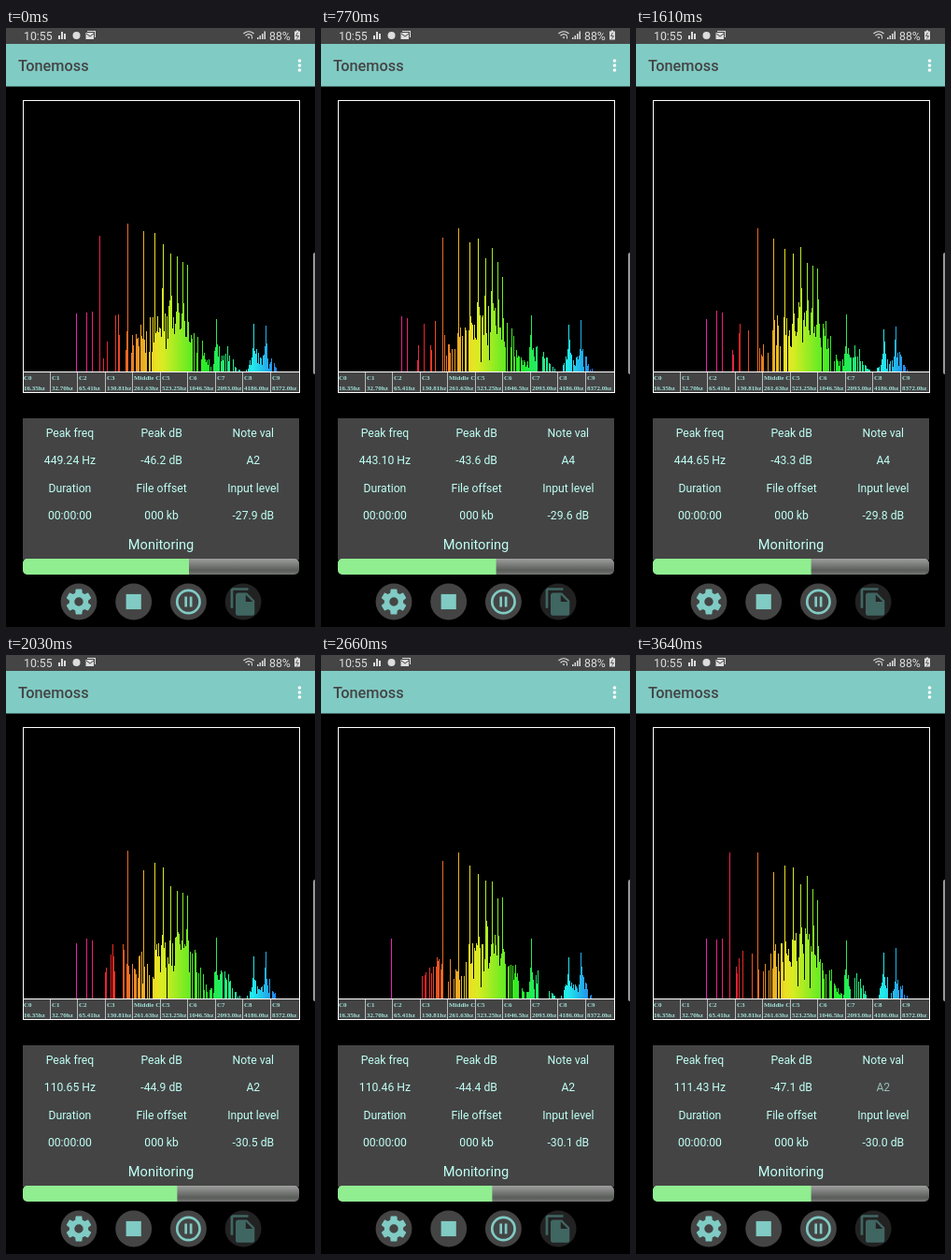
An HTML page for the animation above (3710 ms loop, 331 px wide and 640 px high).

```html
<!DOCTYPE html>
<html lang="en">
<head>
<meta charset="utf-8">
<title>Tonemoss</title>
<style>
  html, body { margin: 0; height: 100%; overflow: hidden; background: #000; }
  svg { display: block; font-family: Roboto, sans-serif; }
  .axis { font: bold 7px "Liberation Serif", serif; fill: #9fe0d8; }
  .panel { font-size: 12.2px; fill: #bffff4; text-anchor: middle; }
  .status { font-size: 12.3px; fill: #ddd; }
  .icon { fill: #80cbc4; }
</style>
</head>
<body>
<svg width="331" height="640" viewBox="0 0 331 640">
  <defs>
    <linearGradient id="hue" gradientUnits="userSpaceOnUse" x1="18" y1="0" x2="314" y2="0"></linearGradient>
    <linearGradient id="track" x2="0" y2="1">
      <stop stop-color="#9d9e9d"/><stop offset=".75" stop-color="#5a5d5a"/><stop offset="1" stop-color="#747674"/>
    </linearGradient>
    <clipPath id="pill"><rect x="18" y="567" width="296" height="17" rx="5"/></clipPath>
  </defs>

  <!-- Status bar -->
  <rect width="331" height="17" fill="#454545"/>
  <g class="status">
    <text x="19" y="12.5">10:55</text>
    <text x="282" y="12.5">88%</text>
    <path d="M56 8h2v4h-2zM59 4h2v8h-2zM62 6h2v6h-2z"/>
    <circle cx="75.5" cy="8" r="4"/>
    <path d="M87 3h9v7h-1V4h-8zM85.5 5h8.5v7h-8.5z"/>
    <path d="M86 6l4 3 4-3" fill="none" stroke="#454545"/>
    <path d="M254.5 6q5.500-4.500 11 0M256.500 8.200q3.500-3 7 0" fill="none" stroke="#ddd" stroke-width="1.2"/>
    <path d="M258.500 9.500h3l-1.500 2zM263 8.500h1v3h-1zM269 10h1.500v2h-1.500zM271.500 8h1.500v4h-1.500zM274 6h1.500v6h-1.500zM276.500 3.500h1.500v8.500h-1.500z"/>
    <path d="M309 3.500h2v-1h2v1h2v9h-6z"/>
    <path d="M312.500 5l-2 3.500h3l-2 3" fill="none" stroke="#454545" stroke-width=".8"/>
  </g>

  <!-- App bar -->
  <rect y="17" width="331" height="45.5" fill="#80cbc4"/>
  <text x="13" y="46" font-size="16.3" font-weight="500" fill="#444">Tonemoss</text>
  <g fill="#fff">
    <circle cx="314.5" cy="35" r="1.8"/><circle cx="314.5" cy="40" r="1.8"/><circle cx="314.5" cy="45" r="1.8"/>
  </g>

  <!-- Spectrum -->
  <rect x="18" y="367" width="296" height="22" fill="#444"/>
  <g id="axis" class="axis"></g>
  <path id="bars" stroke="url(#hue)" shape-rendering="crispEdges"/>
  <path d="M18.5 77.5h296v312h-296zM18 367.5h296" fill="none" stroke="#fff" shape-rendering="crispEdges"/>
  <rect x="329" y="240" width="4" height="130" rx="2" fill="#999"/>

  <!-- Readouts -->
  <rect x="18" y="417" width="296" height="151" fill="#444"/>
  <g id="panel" class="panel"><text x="166" y="557" font-size="14.6">Monitoring</text></g>
  <g clip-path="url(#pill)">
    <rect x="18" y="567" width="296" height="17" fill="url(#track)"/>
    <rect id="level" x="18" y="567" height="17" fill="#90ee90"/>
  </g>

  <!-- Buttons, each drawn on a 24 unit grid -->
  <g id="buttons" class="icon"></g>
</svg>

<script>
const LOOP = 3710, TICK = 70, BASE = 367, OCTAVE = 29.5;
const HELD = [5, 10, 14, 20, 22, 28, 30, 35, 37, 45, 47, 51];  // ticks that repeat the picture before

const byId = id => document.getElementById(id);
const rand = (a, b) => {
  const v = Math.sin(a * 12.9898 + b * 78.233) * 43758.5453;
  return v - Math.floor(v);
};
const mix = (a, b, k) => a + (b - a) * k;

function add(parent, tag, attrs, text = '') {
  const el = document.createElementNS('http://www.w3.org/2000/svg', tag);
  for (const name in attrs) el.setAttribute(name, attrs[name]);
  el.textContent = text;
  return parent.appendChild(el);
}

// Hue climbs evenly with pitch
for (let x = 48; x <= 304; x += 8)
  add(byId('hue'), 'stop', { offset: (x - 18) / 296, 'stop-color': `hsl(${(295 + 1.19 * (x - 58)) % 360} 84% 53%)` });

for (let i = 0; i < 10; i++) {
  const x = Math.round(18 + i * OCTAVE), hz = (16.3516 * 2 ** i).toFixed(i < 6 ? 2 : 1);
  if (i) add(byId('axis'), 'path', { d: `M${x - .5} 367v22`, stroke: '#bbb' });
  add(byId('axis'), 'text', { x: x + 1, y: 376 }, i == 4 ? 'Middle C' : 'C' + i);
  add(byId('axis'), 'text', { x: x + 1, y: 387 }, hz + 'hz');
}

const teeth = Array.from({ length: 6 }, (_, i) =>
  `M12 12m-2.400-6l.5-4h3.800l.5 4z`);
const cells = [['Peak freq', 'Peak dB', 'Note val'], ['', '', ''],
  ['Duration', 'File offset', 'Input level'], ['00:00:00', '000 kb', '']
].map((row, r) => row.map((text, c) =>
  add(byId('panel'), 'text', { x: 68.4 + c * 98.2, y: Math.round(437 + r * 29.4) }, text)));
const [freqText, dbText, noteText] = cells[1], levelText = cells[3][2];

const GEAR = 'M19.430 12.980c.04-.32.07-.64.07-.98s-.03-.66-.07-.98l2.110-1.650c.19-.15.24-.42.12-.64l-2-3.460c-.12-.22-.39-.3-.61-.22l-2.490 1c-.52-.4-1.080-.73-1.690-.98l-.38-2.650C14.460 2.180 14.250 2 14 2h-4c-.25 0-.46.18-.49.42l-.38 2.650c-.61.25-1.170.59-1.690.98l-2.490-1c-.23-.09-.49 0-.61.22l-2 3.460c-.13.22-.07.49.12.64l2.110 1.650c-.04.32-.07.65-.07.98s.03.66.07.98l-2.110 1.650c-.19.15-.24.42-.12.64l2 3.460c.12.22.39.3.61.22l2.490-1c.52.4 1.080.73 1.690.98l.38 2.650c.03.24.24.42.49.42h4c.25 0 .46-.18.49-.42l.38-2.650c.61-.25 1.170-.59 1.690-.98l2.490 1c.23.09.49 0 .61-.22l2-3.460c.12-.22.07-.49-.12-.64zM12 15.500a3.500 3.500 0 1 1 0-7 3.500 3.500 0 0 1 0 7z';
const STOP = 'M6 6h12v12H6z';
const PAUSE = 'M9 16h2V8H9zm3-14a10 10 0 1 0 0 20 10 10 0 0 0 0-20zm0 18a8 8 0 1 1 0-16 8 8 0 0 1 0 16zm1-4h2V8h-2z';
const COPY = 'M16 1H4c-1.100 0-2 .9-2 2v14h2V3h12V1zm-1 4l6 6v10c0 1.100-.9 2-2 2H8c-1.100 0-2-.9-2-2V7c0-1.100.9-2 2-2h7zm-1 7h5.500L14 6.500V12z';
[GEAR, STOP, PAUSE, COPY].forEach((d, i) => {
  const x = 78 + i * 58.7;
  const button = add(byId('buttons'), 'g', {
    transform: `translate(${x} 613) scale(1.35) translate(-12 -12)`, opacity: d == COPY ? .5 : 1
  });
  add(button, 'circle', { cx: 12, cy: 12, r: 14.4, fill: '#444' });
  add(button, 'path', { d });
});

// A few readings; those between are blended
const KEYS = [
  [0, 449.24, -46.2, 'A2', -27.9],
  [11, 443.10, -43.6, 'A4', -29.6],
  [17, 445.48, -40.5, 'A4', -28.9],
  [29, 110.65, -44.9, 'A2', -30.5],
  [38, 110.46, -44.4, 'A2', -30.1],
  [46, 445.04, -42.8, 'A2', -30.3],
  [52, 111.43, -47.1, 'A2', -29.96]
].map(([tick, freq, db, note, level]) => ({ tick, freq, db, note, level }));

function readingsAt(tick) {
  const i = KEYS.findLastIndex(k => k.tick <= tick), a = KEYS[i];
  if (a.tick == tick) return a;
  const b = KEYS[i + 1], k = (tick - a.tick) / (b.tick - a.tick);
  const jitter = n => rand(tick, n) - .5;
  return {
    note: a.note,
    freq: (jitter(1) > 0 ? a : b).freq + jitter(2) * 2,
    db: mix(a.db, b.db, k) + jitter(3) * 2,
    level: mix(a.level, b.level, k) + jitter(4) * .8
  };
}

// Overtones of a low A, some bass lines and three high bumps, as [x, height]
function peaksAt(tick, db) {
  const peaks = [[225, 60], [265, 47], [278, 52]];
  for (let n = 1; n < 10; n++) peaks.push([100 + OCTAVE * Math.log2(n), 150 - .55 * n * n]);
  if (Math.abs(db + 44) < 2) peaks[3][1] = 0;  // the fundamental only shows when the volume swings
  for (const x of [75, 86, 92]) peaks.push([x, rand(x, tick) < .75 ? 60 : 0]);
  return peaks.map(([x, h], i) => [Math.round(x), h * mix(.92, 1.08, rand(tick, i + 5))]);
}

// Broad noise hills: centre, height, width
const HILLS = [[118, 62, 16], [150, 48, 16], [180, 72, 20], [205, 34, 9], [233, 32, 11], [266, 26, 6], [280, 24, 7]];
const floorAt = x => x < 103 ? 0 :
  HILLS.reduce((sum, [mid, h, w]) => sum + h * Math.exp(-(((x - mid) / w) ** 2)), 0);

function barPath(tick, peaks) {
  let d = '';
  for (let x = 50; x < 300; x++) {
    const density = x < 135 ? .34 : x < 160 ? .45 : x < 198 ? .93 : .6;
    const fall = x < 140 ? 1 : x < 163 ? .75 : .28;
    const rough = rand(x, tick + 120);
    let h = rand(x, tick + 1) < density ? floorAt(x) * mix(.35, 1.05, rand(x, tick + 60)) : 0;
    for (const [px, top] of peaks) {
      const off = Math.abs(x - px);
      h = Math.max(h, top * (1 - off * fall) * (off ? mix(.4, 1, rough) : 1));
    }
    if (h >= 2) d += `M${x + .5} ${BASE}v${-Math.round(h)}`;
  }
  return d;
}

function draw(tick) {
  const { freq, db, note, level } = readingsAt(tick);
  byId('bars').setAttribute('d', barPath(tick, peaksAt(tick, db)));
  freqText.textContent = freq.toFixed(2) + ' Hz';
  dbText.textContent = db.toFixed(1) + ' dB';
  noteText.textContent = note;
  noteText.setAttribute('opacity', tick < 46 ? 1 : .65);  // a stale note fades
  levelText.textContent = level.toFixed(1) + ' dB';
  byId('level').setAttribute('width', 178 + 4.2 * (Math.ceil(level) + 27));
}

const start = performance.now();
let shown = -1;
function frame() {
  let tick = Math.floor((performance.now() - start) % LOOP / TICK);
  if (HELD.includes(tick)) tick--;
  if (tick != shown) draw(shown = tick);
  requestAnimationFrame(frame);
}
frame();
</script>
</body>
</html>
```
